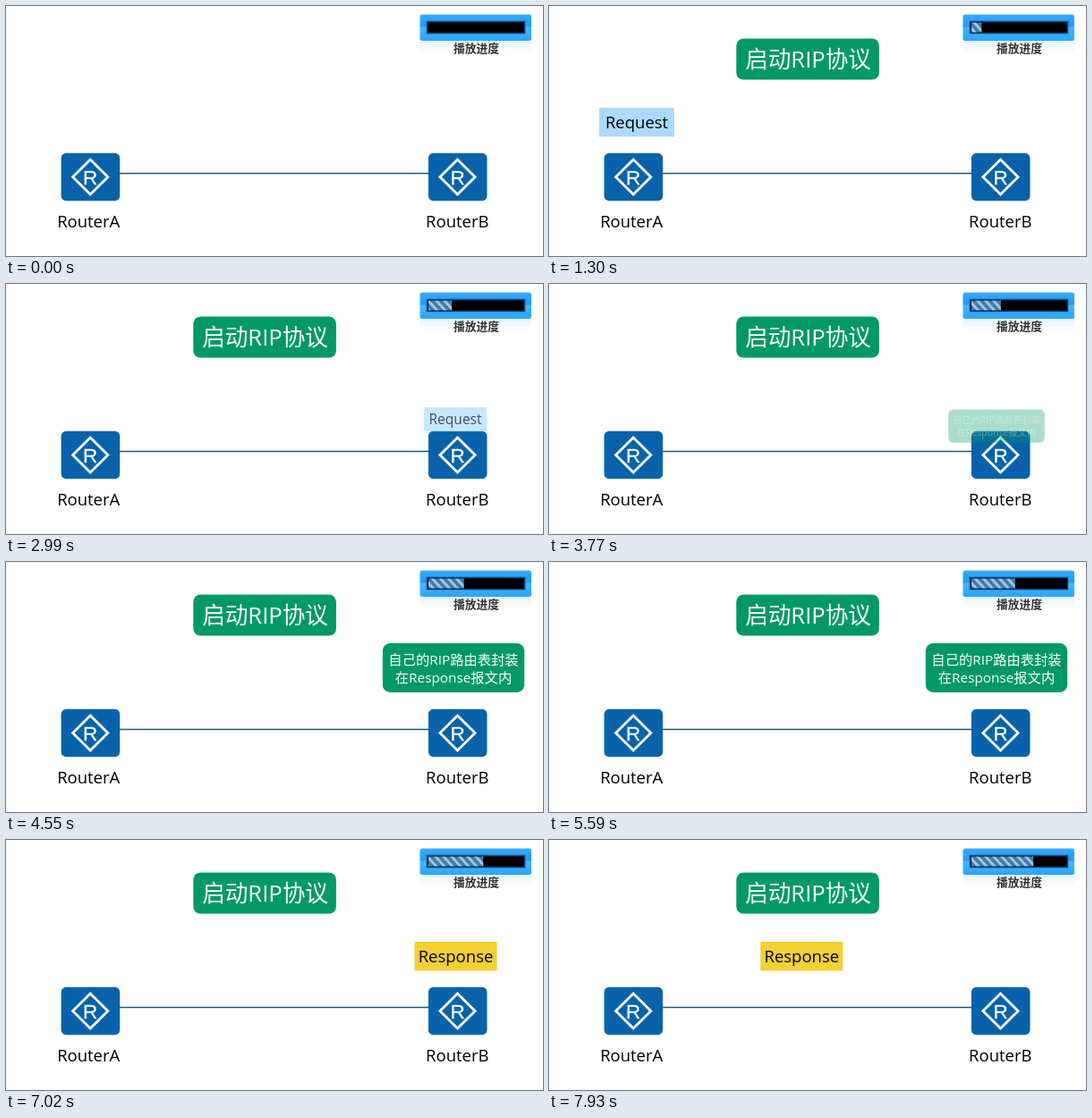
Recreate the animation shown at these times as an HTML page. Size 600 px wide and 280 px high, loop 8 s.

```html
<!DOCTYPE html>
<html lang="zh">
<head>
<meta charset="utf-8">
<title>启动RIP协议</title>
<style>
  html, body { margin: 0; width: 100%; height: 100%; overflow: hidden; background: #fff; }
  svg { display: block; width: 600px; height: 280px; }
  text { font-family: "Open Sans", "Noto Sans CJK SC", "Noto Sans CJK", sans-serif; text-anchor: middle; }
  .label { font-size: 18.5px; fill: #000; }
  .green rect { fill: #009966; }
  .green text { fill: #fff; }
  .small { font-size: 15.3px; font-weight: 500; }
  .glyph { font: 22.5px "Liberation Sans", sans-serif; fill: #fff; stroke: #fff; stroke-width: .3; }
  .caption { font: 700 12.8px "Noto Sans CJK SC", "Noto Sans CJK", sans-serif; fill: #333; }
</style>
</head>
<body>
<svg viewBox="0 0 600 280">
  <defs>
    <linearGradient id="shell" x2="0" y2="1">
      <stop offset="0" stop-color="#36a9fd"/>
      <stop offset=".44" stop-color="#1f9cfb"/>
      <stop offset=".5" stop-color="#45b4ff"/>
      <stop offset="1" stop-color="#2aa6ff"/>
    </linearGradient>
    <linearGradient id="mirror" x2="0" y2="1">
      <stop offset="0" stop-color="#8fd0ff" stop-opacity=".2"/>
      <stop offset="1" stop-color="#8fd0ff" stop-opacity="0"/>
    </linearGradient>
    <pattern id="stripes" width="9" height="20" patternUnits="userSpaceOnUse">
      <rect width="9" height="20" fill="#437ca8"/>
      <rect width="4" height="20" fill="#9cc6e2"/>
    </pattern>
    <g id="router">
      <rect x="-32.6" y="-26.7" width="65.6" height="53.4" rx="5.5" fill="#0862ab"/>
      <path d="M0-19.6L19.6 0L0 19.6L-19.6 0Z" fill="none" stroke="#fff" stroke-width="2.8"/>
      <text class="glyph" y="8">R</text>
    </g>
  </defs>

  <path d="M127 187.4H472" stroke="#1c5878" stroke-width="1.5"/>
  <use href="#router" x="94.2" y="191.5"/>
  <use href="#router" x="504.5" y="191.5"/>
  <text class="label" x="92.2" y="248">RouterA</text>
  <text class="label" x="504.3" y="248">RouterB</text>

  <rect x="462.5" y="40" width="124.5" height="13" rx="2" fill="url(#mirror)"/>
  <rect x="462.5" y="9.5" width="124.5" height="29.5" rx="2.5" fill="url(#shell)"/>
  <rect x="470.5" y="17.5" width="109" height="13" fill="#000" stroke="#08467a" stroke-width="1.5"/>
  <rect id="bar" x="472" y="18.5" height="11" fill="url(#stripes)"/>
  <text class="caption" x="525.5" y="51.5">播放进度</text>

  <g id="title" class="green">
    <rect x="-79.7" y="-23" width="159.6" height="46" rx="8"/>
    <text x=".5" y="9" font-size="25.6">启动RIP协议</text>
  </g>
  <g id="request">
    <rect x="-42" y="-16.2" width="84" height="32.4" fill="#aadbff"/>
    <text class="label" y="7">Request</text>
  </g>
  <g id="note" class="green">
    <rect x="-79.2" y="-27.5" width="158.4" height="55" rx="8.5"/>
    <text class="small" y="-4">自己的RIP路由表封装</text>
    <text class="small" y="16">在Response报文内</text>
  </g>
  <g id="response">
    <rect x="-46" y="-16.2" width="92" height="32.4" fill="#f5cf33"/>
    <text class="label" y="7">Response</text>
  </g>
</svg>
<script>
  const LOOP = 8000, TICK = 130, FADE = 390;
  const el = id => document.getElementById(id);
  const clamp = v => Math.max(0, Math.min(1, v));
  const phase = (t, start, length = FADE) => clamp((t - start) / length);
  const mix = (a, b, p) => a + (b - a) * p;

  // shown: 0 is hidden, sunk by drop and shrunk; 1 is fully in place.
  // Box and text each fade on their own, so fill-opacity is inherited.
  function place(id, x, y, shown, drop = 0) {
    const away = 1 - shown;
    const scale = drop ? 1 - 0.48 * away : 1;
    el(id).setAttribute("transform", `translate(${x} ${y + drop * away}) scale(${scale})`);
    el(id).setAttribute("fill-opacity", shown);
  }

  function draw(t) {
    const filled = 0.00872 * t;
    el("bar").setAttribute("width", filled);
    el("stripes").setAttribute("patternTransform", `translate(${472 + filled}) skewX(42)`);

    place("title", 289, 59.5, phase(t, 260));

    const requestX = mix(98, 502, phase(t, 1430, 1300));
    place("request", requestX, 130.2, phase(t, 910) - phase(t, 2860), 64);

    const leaving = phase(t, 5980);
    if (leaving) place("note", 500, 118.5, 1 - leaving);
    else place("note", 500, 118.5, phase(t, 3640), 61);

    const responseX = 502.5 - 36.7 * Math.max(0, t - 7150) / TICK;
    place("response", responseX, 130.2, phase(t, 6630), 92);
  }

  const begin = performance.now();
  function loop() {
    const t = (performance.now() - begin) % LOOP;
    draw(Math.floor(t / TICK) * TICK);
    requestAnimationFrame(loop);
  }
  draw(0);
  requestAnimationFrame(loop);
</script>
</body>
</html>
```
